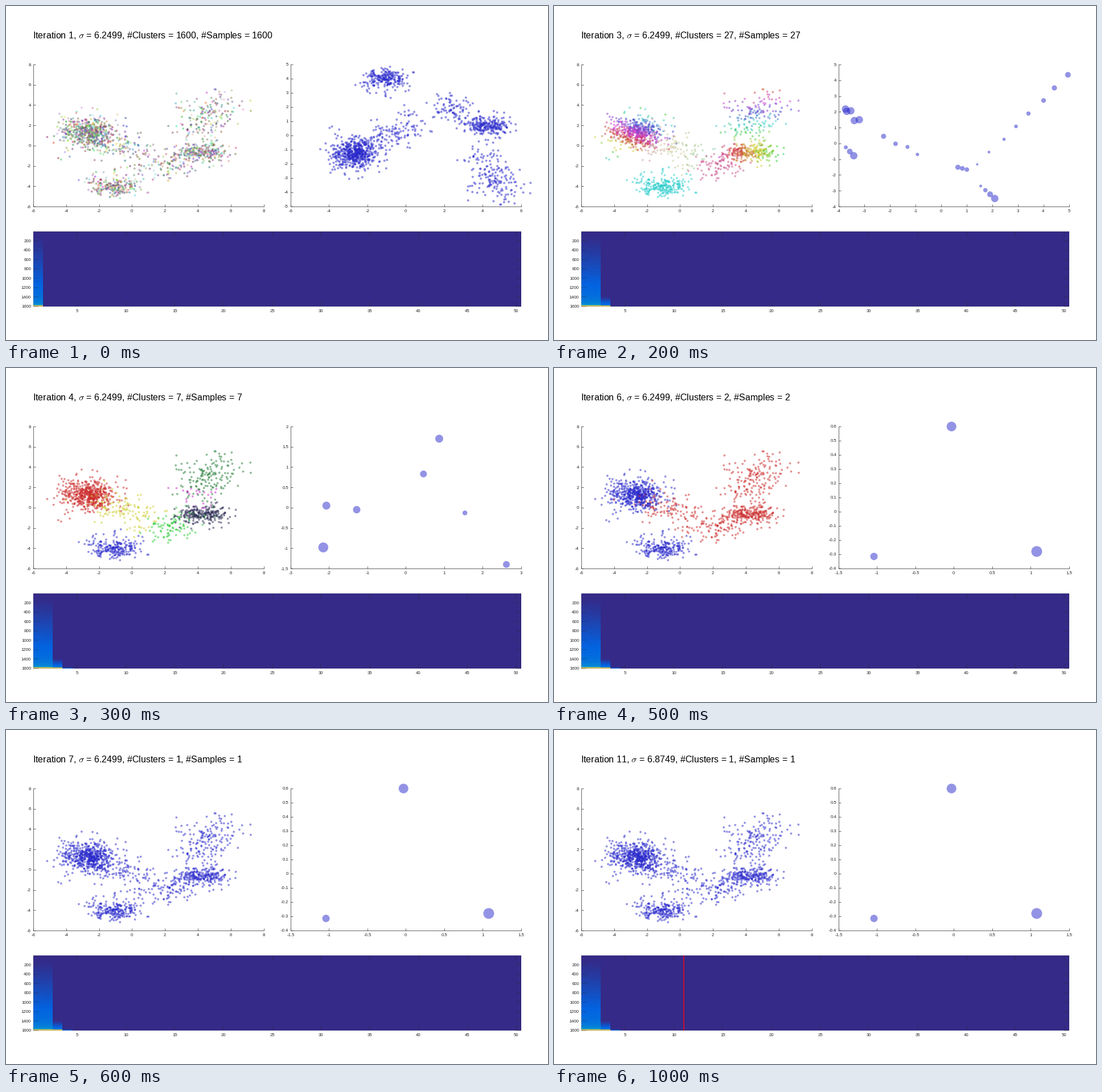
Animation, 952 px wide and 588 px high, one loop 1.1 s. Source, as a matplotlib script:

```python
import colorsys

import matplotlib.pyplot as plt
import numpy as np
from matplotlib.animation import FuncAnimation
from matplotlib.colors import LinearSegmentedColormap

W, H, DPI = 952, 588, 64
PT = 72 / DPI  # points per pixel
INK = "0.15"

plt.rcParams.update({
    "font.family": "Liberation Sans",
    "mathtext.fontset": "cm",
    "axes.unicode_minus": False,
    "axes.linewidth": 0.7 * PT,
    "axes.edgecolor": INK,
})

rng = np.random.default_rng(11)


def hsv(h, s=0.8, v=0.8):
    return colorsys.hsv_to_rgb(h % 1, s, v)


def cloud(n, start, end, spread):
    """Evenly spaced points on a segment, each pushed off by Gaussian noise."""
    noise = np.clip(rng.normal(size=(n, 2)), -2.8, 2.8)
    return np.linspace(start, end, n) + noise * spread


# ---- left panel: samples and their colours at each stage
LEFT, MIDDLE, BOTTOM, RIGHT, TOP, LOWER, BRIDGE = range(7)
groups = [
    (LEFT, 340, (-2.9, 1.4), (-2.4, 1.1), (0.68, 0.62)),
    (LEFT, 220, (-3.2, 1.6), (-2.3, 1.0), (0.95, 0.9)),
    (MIDDLE, 135, (-2.3, 1.0), (1.2, -1.3), (0.65, 0.7)),
    (BOTTOM, 170, (-1.4, -4.1), (-0.9, -4.0), (0.68, 0.5)),
    (BOTTOM, 60, (-2.5, -3.5), (0.6, -3.5), (0.4, 0.6)),
    (RIGHT, 230, (3.1, -0.9), (5.4, -0.6), (0.4, 0.48)),
    (TOP, 180, (4.1, 0.9), (5.1, 4.7), (0.85, 0.6)),
    (LOWER, 95, (1.3, -2.9), (3.7, -0.9), (0.6, 0.65)),
]
samples = np.vstack([cloud(*spec) for _, *spec in groups])
kind = np.repeat([g[0] for g in groups], [g[1] for g in groups])
order = rng.permutation(len(samples))
samples, kind = samples[order], kind[order]
count = len(samples)

low = (kind == TOP) & (samples[:, 1] < 2)
kind[low & (rng.random(count) < 0.5)] = BRIDGE


def random_colors(n):
    return np.array([hsv(rng.random(), rng.uniform(0.2, 0.8),
                         rng.uniform(0.45, 0.95)) for _ in range(n)])


def nearest(points, centres):
    return ((points[:, None] - centres) ** 2).sum(-1).argmin(1)


# hue = base + slope . (x, y) inside each group, then saturation
hue_rules = np.array([
    (0.78, -0.1, -0.17, 0.7), (0.2, 0.1, 0, 0.25), (0.5, 0, 0, 0.8),
    (-0.37, 0.115, 0, 0.8), (0.17, 0, 0.15, 0.7), (0.9, 0, 0, 0.6),
    (0.17, 0, 0.15, 0.7),
])[kind]


def regional_colors():
    x, y = (samples + rng.normal(0, 0.3, samples.shape)).T
    hue = hue_rules[:, 0] + hue_rules[:, 1] * x + hue_rules[:, 2] * y
    hue = np.round(hue * 12) / 12
    return np.array([hsv(h, s) for h, s in zip(hue, hue_rules[:, 3])])


BLUE, RED, GREEN = hsv(2 / 3), hsv(0), hsv(0.345)
seven = np.array([RED, hsv(1 / 6), BLUE, hsv(2 / 3, 0.55, 0.3),
                  hsv(0.37, 0.75, 0.48), GREEN, hsv(5 / 6)])
three = np.array([BLUE, RED, BLUE, RED, GREEN, RED, RED])
two = np.array([BLUE, RED, BLUE, RED, RED, RED, RED])

cells = samples[rng.choice(count, 280, replace=False)]
cell = nearest(samples + rng.normal(0, 0.6, samples.shape), cells)
stage_colors = [random_colors(count), random_colors(280)[cell],
                regional_colors(), seven[kind], three[kind], two[kind],
                np.tile(BLUE, (count, 1))]


# ---- right panel: centres and diameters at each stage
def condense(k):
    """Mirror the samples and pull each one towards its group's mean."""
    means = np.array([samples[kind == g].mean(0) for g in range(7)])[kind]
    return (means + k * (samples - means)) * (1, -1)


def sized_rows(rows):
    """Stack (diameter range, cloud arguments) rows into points and sizes."""
    points = np.vstack([cloud(*args) for _, *args in rows])
    sizes = np.concatenate([np.linspace(*d, args[0]) for d, *args in rows])
    return points, sizes


def many_centres():
    points = np.vstack([
        cloud(105, (-3.4, -2.4), (-2.4, -1.1), (0.16, 0.25)),
        cloud(26, (-2.4, -0.9), (-0.5, 1.5), (0.25, 0.35)),
        cloud(38, (-2.3, 3.4), (-1.8, 3.4), (0.28, 0.22)),
        cloud(14, (-2.6, 2.6), (1.0, 3.4), (0.3, 0.4)),
        cloud(42, (1.4, 2.3), (2.8, 1.9), (0.18, 0.15)),
        cloud(14, (2.9, 1.5), (3.8, 0.6), (0.15, 0.15)),
        cloud(41, (4.1, 0.1), (6.6, -3.1), (0.2, 0.2)),
    ])
    return points, 3.5 + 5 * rng.random(len(points)) ** 2.5


few_centres = sized_rows([
    ((13, 13), 5, (-3.8, 2.1), (-3.2, 1.5), (0.05, 0.2)),
    ((7, 13), 3, (-3.72, -0.25), (-3.41, -0.78), 0),
    ((9, 6), 4, (-2.3, 0.5), (-1.0, -0.8), 0.1),
    ((9, 8), 3, (0.66, -1.51), (1.01, -1.66), 0),
    ((5, 13), 4, (1.55, -2.7), (2.1, -3.49), 0),
    ((4, 10), 8, (1.35, -1.35), (5, 4.36), 0.03),
])
seven_centres = np.array([
    (-2.07, 0.05, 14), (-1.28, -0.05, 13), (-2.15, -0.98, 17.5),
    (0.46, 0.83, 12), (0.87, 1.7, 14), (1.54, -0.13, 8.5), (2.62, -1.4, 12)])
three_centres = np.array([
    (-0.03, 0.6, 17), (-1.04, -0.315, 13), (1.08, -0.28, 19)])

# (points, diameters), x range and step, y range and step
panels = [
    ((condense(0.72), np.full(count, 4.0)), (-6, 6, 2), (-5, 5, 1)),
    (many_centres(), (-4, 8, 2), (-4, 4, 1)),
    (few_centres, (-4, 5, 1), (-4, 5, 1)),
    ((seven_centres[:, :2], seven_centres[:, 2]), (-3, 3, 1), (-1.5, 2, 0.5)),
    ((three_centres[:, :2], three_centres[:, 2]),
     (-1.5, 1.5, 0.5), (-0.4, 0.6, 0.1)),
]
clusters = [1600, 280, 27, 7, 3, 2, 1]

# ---- spectrum image
parula = LinearSegmentedColormap.from_list("spectrum", [
    (0, "#352a87"), (0.14, "#0363e1"), (0.36, "#079dcf"),
    (0.6, "#7abf96"), (0.9, "#f5bd40"), (1, "#f9fb0e")])

depth = np.linspace(0, 1, 1600)


def jump(at):
    return 1 / (1 + np.exp(-500 * (depth - at)))


def ramp(start, end):
    return np.clip((depth - start) / (end - start), 0, 1)


spectrum = np.zeros((1600, 50))
for col, bands in enumerate((36, 24)):
    step = np.floor(depth * bands) / bands
    spectrum[:, col] = (0.22 * step ** 1.2 + 0.15 * depth ** 20
                        + 0.5 * jump(0.983))
spectrum[:, 2] = 0.18 * ramp(0.87, 0.98) + 0.72 * jump(0.987)
spectrum[:, 3] = 0.2 * ramp(0.985, 1)

# ---- stage
fig = plt.figure(figsize=(W / DPI, H / DPI), dpi=DPI, facecolor="white")


def add_panel(x0, y0, x1, y1, tick, line=0.7):
    ax = fig.add_axes([x0 / W, 1 - y1 / H, (x1 - x0) / W, (y1 - y0) / H])
    ax.tick_params(direction="in", length=tick * PT, width=line * PT,
                   color=INK, labelcolor=INK, labelsize=7.8 * PT)
    ax.tick_params(axis="x", pad=4.7 * PT)
    ax.tick_params(axis="y", pad=4 * PT)
    return ax


def set_axis(axis, lo, hi, step):
    ticks = np.round(np.arange(lo, hi + step / 2, step), 3) + 0.0
    axis.set_ticks(ticks, [f"{v:g}" for v in ticks])
    axis.axes.set(**{f"{axis.axis_name}lim": (lo, hi)})


def area(diameter):
    return (np.asarray(diameter) * PT) ** 2


left = add_panel(48, 103, 452.5, 353, 4)
right = add_panel(500, 103, 904.5, 353, 4)
for ax in (left, right):
    ax.spines[["top", "right"]].set_visible(False)
set_axis(left.xaxis, -6, 8, 2)
set_axis(left.yaxis, -6, 8, 2)

style = dict(alpha=0.5, linewidths=0, clip_on=False, zorder=3)
left_dots = left.scatter(*samples.T, s=area(3.8), color=stage_colors[0],
                         **style)
right_dots = right.scatter([], [], color=[BLUE], **style)

base = add_panel(48, 397, 904.4, 529, 8.5, line=0.4)
base.tick_params(top=True, right=True)
base.spines[:].set(linewidth=0.4 * PT, alpha=0.5)
image = base.imshow(spectrum, cmap=parula, vmin=0, vmax=1, aspect="auto",
                    interpolation="nearest", extent=(0.5, 50.5, 1600.5, 0.5))
base.set_xticks(range(5, 51, 5))
base.set_yticks(range(200, 1601, 200))
marker = base.axvline(11, color=(0.76, 0.06, 0.2), lw=2 * PT)

title = fig.text(47.2 / W, 1 - 57 / H, "", size=16 * PT, color="black",
                 va="baseline")


def update(i):
    n = clusters[min(i, 6)]
    sigma = 6.8749 if i == 10 else 6.2499
    title.set_text(rf"Iteration {i + 1}, $\sigma$ = {sigma}, "
                   f"#Clusters = {n}, #Samples = {n}")
    left_dots.set_facecolor(stage_colors[min(i, 6)])

    (points, sizes), x_axis, y_axis = panels[min(i, 4)]
    right_dots.set_offsets(points)
    right_dots.set_sizes(area(sizes))
    set_axis(right.xaxis, *x_axis)
    set_axis(right.yaxis, *y_axis)

    image.set_data(np.where(np.arange(50) <= i, spectrum, 0))
    marker.set_visible(i == 10)
    return left_dots, right_dots, image, marker, title


anim = FuncAnimation(fig, update, frames=11, interval=100, repeat=True,
                     repeat_delay=0, blit=False)
plt.show()
```
